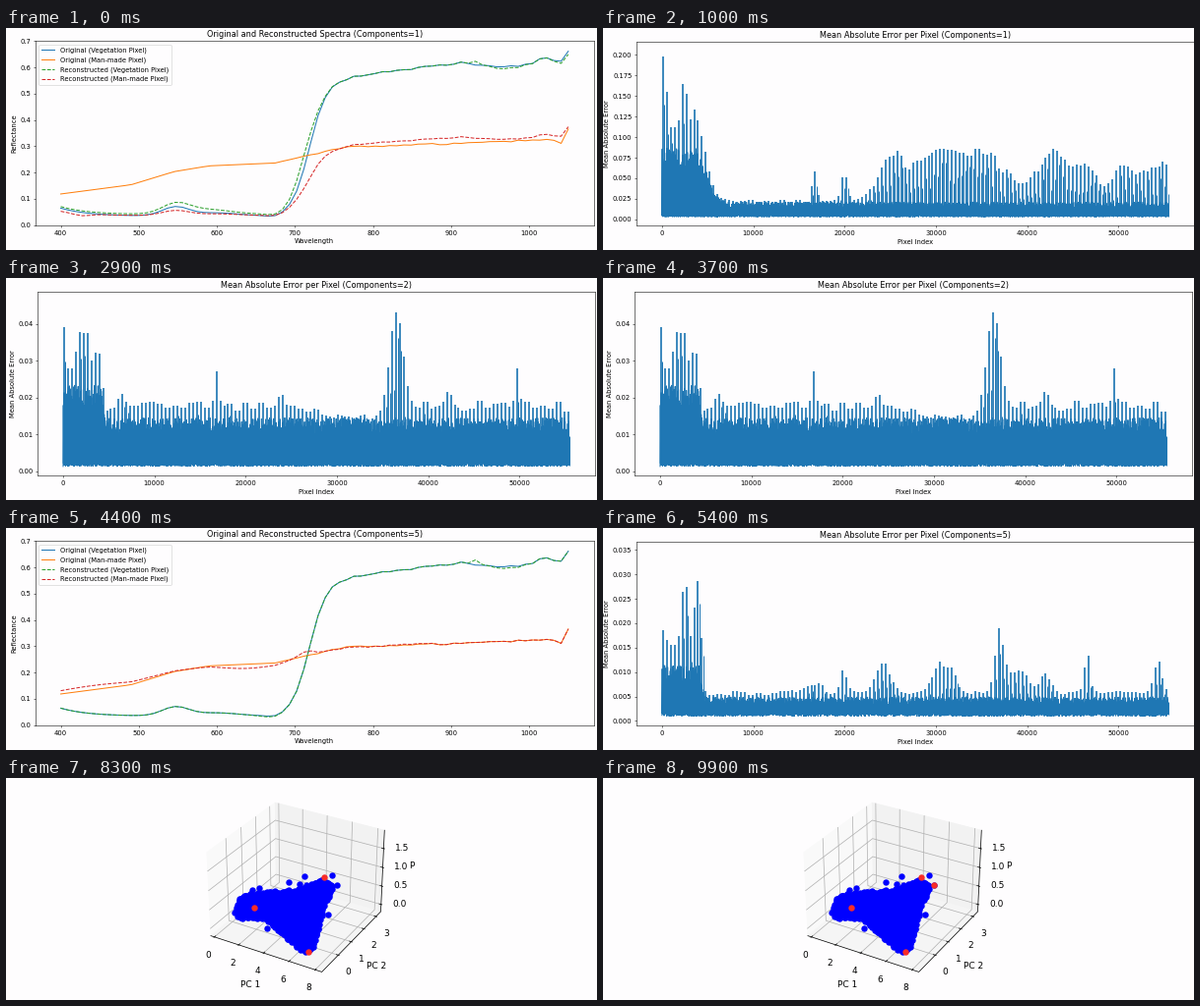
A matplotlib script that plays this animation: 600x226 px, repeating every 10 s.

```python
import numpy as np
import matplotlib.pyplot as plt
from matplotlib.animation import FuncAnimation
from matplotlib.path import Path

W, H, DPI = 600, 226, 64
PX = 72 / DPI          # points per pixel
K = 0.674 * PX         # scale of the default style sizes
FRAMES, STEP = 100, 100
PAPER = "#fefdfe"

plt.rcParams.update({
    "font.family": "DejaVu Sans",
    "font.size": 10 * K,
    "lines.linewidth": 1.5 * K,
    "axes.linewidth": 0.8 * K,
    "axes.titlepad": 6 * K,
    "axes.labelpad": 4 * K,
    "axes.facecolor": PAPER,
    "patch.linewidth": 1.0 * K,
})
for a in "xy":
    plt.rcParams.update({
        f"{a}tick.major.size": 3.5 * K,
        f"{a}tick.major.width": 0.8 * K,
        f"{a}tick.major.pad": 3.5 * K,
    })

fig = plt.figure(figsize=(W / DPI, H / DPI), dpi=DPI, facecolor=PAPER)


def add_axes(left, top, right, bottom):
    ax = fig.add_axes([left / W, 1 - bottom / H,
                       (right - left) / W, (bottom - top) / H])
    ax.set_visible(False)
    return ax


def bumps(x, *params):
    """Sum of Gaussian bumps given as (centre, width, height)."""
    return sum(h * np.exp(-((x - c) / w) ** 2) for c, w, h in params)


def step(x, centre, width):
    return 1 / (1 + np.exp(-np.clip((x - centre) / width, -50, 50)))


# ---------- spectra ----------

WL = np.linspace(400, 1050, 72)
RISE = step(WL, 718.7, 11)
jitter = np.random.default_rng(6).normal(0, 0.002, (2, WL.size)) * RISE

veg = (0.034 + 0.03 * np.exp((400 - WL) / 35) + 0.525 * RISE + jitter[0]
       + 0.0004 * np.clip(WL - 760, 0, 130) + 0.05 * np.exp((WL - 1050) / 6)
       + bumps(WL, (547, 24, 0.034), (600, 40, 0.012), (675, 15, -0.008),
               (912, 9, 0.01), (965, 25, -0.01), (1020, 15, 0.025)))
man = jitter[1] + np.interp(
    WL, [400, 490, 545, 590, 675, 757, 1030, 1041, 1050],
    [0.118, 0.153, 0.203, 0.225, 0.236, 0.295, 0.324, 0.31, 0.365])

veg1 = veg + 0.006 * (1 - RISE) + bumps(
    WL, (565, 40, 0.012), (712, 17, 0.048), (932, 6, 0.015),
    (970, 20, -0.008), (1050, 15, -0.012))
man1 = 0.55 * veg + 0.017 - 0.022 * RISE + bumps(
    WL, (427, 14, -0.008), (705, 18, 0.014), (750, 14, -0.006), (1050, 4, 0.015))
veg5 = veg + bumps(WL, (665, 20, -0.003), (932, 6, 0.02), (972, 18, -0.007))
man5 = man + bumps(WL, (440, 80, 0.016), (640, 45, -0.016), (715, 14, 0.018),
                   (775, 30, -0.003), (840, 30, 0.003))
veg2 = (veg1 + veg5) / 2
man2 = 0.8 * man5 + 0.2 * man1


def spectra(n, veg_fit, man_fit):
    ax = add_axes(29.8, 13.3, 596.6, 200.8)
    for kind, style, pair in [("Original", "-", (veg, man)),
                              ("Reconstructed", "--", (veg_fit, man_fit))]:
        for y, what in zip(pair, ("Vegetation", "Man-made")):
            ax.plot(WL, y, style, label=f"{kind} ({what} Pixel)")
    ax.set(xlim=(367.5, 1082.5), ylim=(-0.001, 0.7),
           xlabel="Wavelength", ylabel="Reflectance",
           title=f"Original and Reconstructed Spectra (Components={n})")
    ax.legend(loc="upper left")
    return [ax]


# ---------- error per pixel ----------

N, ROWS = 55.4, 130    # thousands of pixels, image rows


def error(n, left, ylim, tick, low, edge, body, spikes, peaks):
    """Noisy band with one spike per image row.

    body and spikes are (level, extra level before the edge).
    """
    rng = np.random.default_rng(n)
    ax = add_axes(left, 14.3, left + 565.5, 201.2)

    def level(x, pair):
        return pair[0] + pair[1] * step(-x, -edge[0], edge[1])

    x = np.linspace(0, N, 2400)
    y = level(x, body) * rng.uniform(0.66, 1, x.size)
    y[::2] = low * rng.uniform(0.8, 1.4, x[::2].size)
    ax.plot(1000 * x, y, color="C0")

    # neighbouring rows share their height, with a shorter shoulder beside
    rows = np.linspace(0.1, N - 0.1, ROWS)
    top = level(rows, spikes) + bumps(rows, *peaks)
    top *= np.repeat(rng.uniform(0.86, 1.03, ROWS // 2), 2)
    ax.vlines(1000 * rows, low, top, color="C0", lw=1.7 * PX)
    ax.vlines(1000 * rows + 160, low, top * rng.uniform(0.45, 0.85, ROWS),
              color="C0", lw=PX)

    ax.set(xlim=(-2770, 58240), ylim=ylim,
           xticks=range(0, 50001, 10000),
           yticks=np.arange(0, ylim[1], tick),
           xlabel="Pixel Index", ylabel="Mean Absolute Error",
           title=f"Mean Absolute Error per Pixel (Components={n})")
    return [ax]


error1 = error(
    1, 34.2, (-0.0077, 0.2157), 0.025, 0.0037, (5, 0.5),
    (0.021, 0.066), (0.024, 0.095),
    [(0.2, 0.35, 0.085), (2.4, 0.35, 0.06), (3.7, 0.35, 0.05),
     (16.7, 0.4, 0.04), (20, 0.5, 0.032), (25, 1.8, 0.055), (30, 3.5, 0.06),
     (35.5, 3.5, 0.053), (42.5, 2, 0.058), (46, 2.5, 0.045),
     (50.5, 1.5, 0.038), (54.5, 2.5, 0.05)])
error2 = error(
    2, 32.3, (-0.0012, 0.0486), 0.01, 0.0016, (4.4, 0.1),
    (0.0145, 0.009), (0.0185, 0.013),
    [(0, 0.3, 0.015), (1.6, 0.3, 0.009), (2.5, 0.3, 0.011), (6.5, 0.6, 0.003),
     (16.8, 0.3, 0.009), (24, 0.5, 0.005), (32, 3, -0.003), (36.5, 1, 0.028),
     (42, 1, 0.004), (49.7, 0.3, 0.009)])
error5 = error(
    5, 34.2, (-0.00095, 0.0366), 0.005, 0.0012, (4.4, 0.08),
    (0.0049, 0.0065), (0.006, 0.0115),
    [(0, 0.4, 0.003), (2.5, 0.35, 0.017), (3.9, 0.5, 0.0145),
     (16.5, 1.5, 0.002), (19.9, 0.5, 0.0055), (24.3, 1.2, 0.0065),
     (31, 1.5, 0.0065), (36.9, 0.7, 0.0135), (39, 1.5, 0.0045),
     (42, 0.8, 0.005), (46.6, 0.4, 0.008), (54.4, 0.8, 0.006)])


# ---------- principal component cloud ----------

LIMS = np.array([(-0.3, 8.5), (-1.2, 3.4), (-0.2, 1.97)])
BOX = np.array([0.5953, 0.5953, 0.4464])
AZ, EL = np.radians(-60), np.radians(30)
RIGHT = np.array([-np.sin(AZ), np.cos(AZ), 0])
UP = np.array([-np.sin(EL) * np.cos(AZ), -np.sin(EL) * np.sin(AZ), np.cos(EL)])
EYE = np.cross(RIGHT, UP)


def project(*p):
    q = (2 * (np.array(p) - LIMS[:, 0]) / np.ptp(LIMS, axis=1) - 1) * BOX
    s = 1084 / (10 - q @ EYE)
    return 295.8 + s * (q @ RIGHT), 107.1 - s * (q @ UP)


def dots(ax, pts, color, z):
    return ax.plot(*np.transpose(pts), "o", color=color,
                   ms=6.4 * PX, mew=0, zorder=z)[0]


def cloud_axes():
    ax = add_axes(0, 0, W, H)
    ax.set(xlim=(0, W), ylim=(H, 0))
    ax.axis("off")
    (x0, x1), (y0, y1), (z0, z1) = LIMS

    def line(*pts, color="black", z=2):
        ax.plot(*zip(*(project(*p) for p in pts)), color=color,
                lw=0.72 * PX, zorder=z)

    def text(x, y, s):
        ax.text(x, y, s, size=9 * PX, ha="center", va="center")

    def tick(p, axis, span, offset, label):
        """Short mark across the edge at p, and its label."""
        ends = np.array([p, p], float)
        ends[:, axis] += span * np.ptp(LIMS[axis]) / 12
        line(*ends)
        x, y = project(*p)
        text(x + offset[0], y + offset[1], label)

    panes = [("0.975", [(x0, y0, z0), (x0, y1, z0), (x0, y1, z1), (x0, y0, z1)]),
             ("0.95", [(x0, y1, z0), (x1, y1, z0), (x1, y1, z1), (x0, y1, z1)]),
             ("0.9625", [(x0, y0, z0), (x1, y0, z0), (x1, y1, z0), (x0, y1, z0)])]
    for shade, pts in panes:
        ax.fill(*zip(*(project(*p) for p in pts)), color=shade,
                lw=0.7 * PX, zorder=0)

    grid = dict(color="#b0b0b0", z=1)
    inner, outer = np.array([0.2, -0.1]), np.array([-0.2, 0.1])
    for v in range(0, 9, 2):
        line((v, y0, z0), (v, y1, z0), (v, y1, z1), **grid)
        tick((v, y0, z0), 1, inner, (-6.3, 18.5), str(v))
    for v in range(4):
        line((x1, v, z0), (x0, v, z0), (x0, v, z1), **grid)
        tick((x1, v, z0), 0, outer, (10.1, 17.4), str(v))
    for v in (0.0, 0.5, 1.0, 1.5):
        line((x0, y0, v), (x0, y1, v), (x1, y1, v), **grid)
        tick((x1, y1, v), 0, outer, (18.8, -0.6), f"{v:.1f}")
    line((x0, y0, z0), (x1, y0, z0), (x1, y1, z0), (x1, y1, z1))

    text(248, 210.5, "PC 1")
    text(376.5, 191, "PC 2")
    text(411.5, 90, "P")

    # point cloud as a filled outline with scattered dots
    hull = np.array([(231, 139), (238, 121), (250, 117), (292, 114), (320, 104),
                     (333, 109), (322, 135), (313, 171), (306, 177), (299, 176),
                     (279, 158), (262, 143), (238, 143)])
    rng = np.random.default_rng(4)
    pts = rng.uniform(hull.min(0), hull.max(0), (2600, 2))
    pts = pts[Path(hull).contains_points(pts)]
    strays = [(302.5, 100), (298, 108), (287, 106), (257, 111.5), (250, 113.5),
              (330.5, 98.5), (335.5, 108.5), (327, 139), (265, 153)]
    ax.fill(*hull.T, color="blue", lw=0, zorder=3)
    dots(ax, np.vstack([pts, strays]), "blue", 3)
    return ax


cloud = cloud_axes()
marks = [dots(cloud, [p], "#f82c28", 4)
         for p in [(323, 101), (307, 177), (252, 132.3), (335.8, 108.8)]]

scenes = [spectra(1, veg1, man1), error1,
          spectra(2, veg2, man2), error2,
          spectra(5, veg5, man5), error5]
scenes += [[cloud] + marks[:n] for n in range(1, 5)]
everything = {artist for scene in scenes for artist in scene}


def update(i):
    scene = scenes[int((i + 1.7) / 10.2)]
    for artist in everything:
        artist.set_visible(artist in scene)
    return []


anim = FuncAnimation(fig, update, frames=FRAMES, interval=STEP,
                     repeat=True, repeat_delay=0, blit=False)
plt.show()
```
